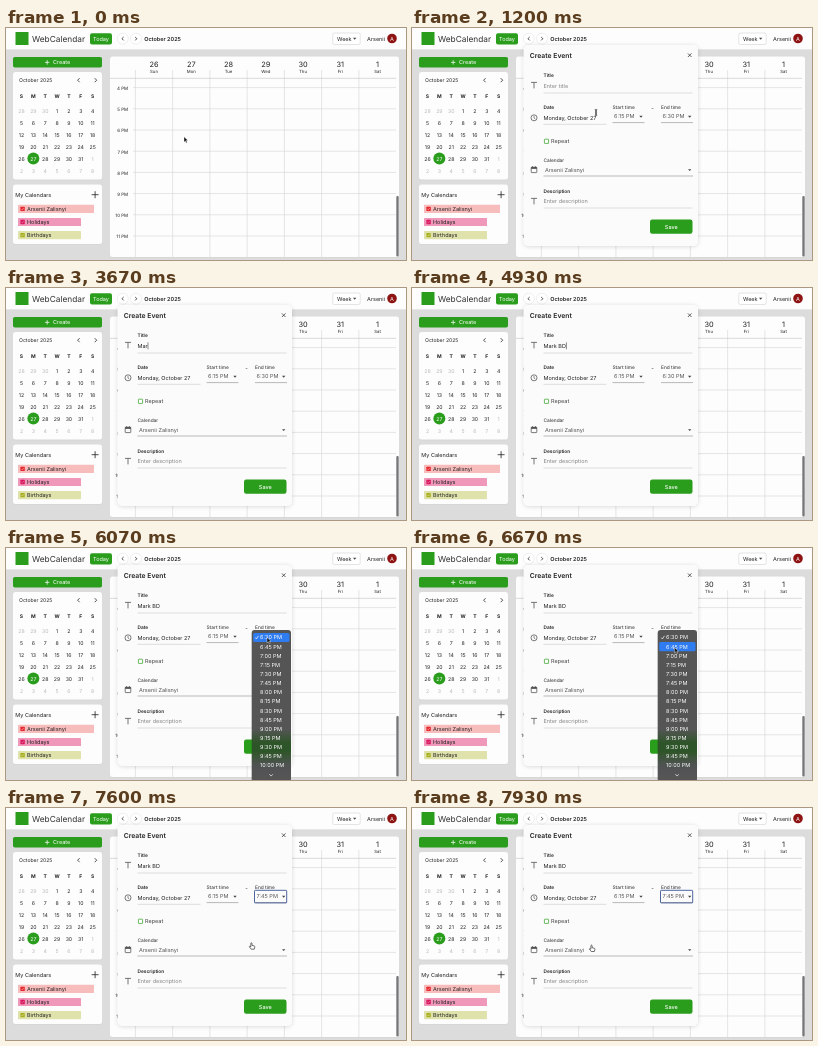
Animation, 400 px wide and 232 px high, one loop 8000 ms. Source, as an HTML page:

```html
<!DOCTYPE html>
<html lang="en">
<head>
<meta charset="utf-8">
<title>Calendar: create event</title>
<style>
  html, body { margin: 0; width: 100%; height: 100%; overflow: hidden; background: #dcdcdd; }
  svg { display: block; width: 100vw; height: 100vh; }
  text { font-family: Inter, Roboto, sans-serif; white-space: pre; text-rendering: geometricPrecision; }
</style>
</head>
<body>
<svg id="stage" viewBox="0 0 400 232" xmlns="http://www.w3.org/2000/svg">
  <defs>
    <filter id="soft" x="-20%" y="-20%" width="140%" height="140%">
      <feDropShadow dx="0" dy=".6" stdDeviation="2" flood-opacity=".15"/>
    </filter>
    <filter id="faint" x="-10%" y="-10%" width="120%" height="120%">
      <feDropShadow dx="0" dy=".2" stdDeviation=".6" flood-opacity=".12"/>
    </filter>
    <linearGradient id="menuFill" x1="0" y1="82" x2="0" y2="232" gradientUnits="userSpaceOnUse">
      <stop offset="0" stop-color="#555557"/>
      <stop offset=".66" stop-color="#555557"/>
      <stop offset=".75" stop-color="#2f5529"/>
      <stop offset=".81" stop-color="#2f5529"/>
      <stop offset=".9" stop-color="#505252"/>
      <stop offset="1" stop-color="#555557"/>
    </linearGradient>
  </defs>
</svg>
<script>
const LOOP = 8000;
const GREEN = '#2a9d1c', INK = '#222', MUTED = '#858585', LINE = '#d3d3d5';
const stage = document.getElementById('stage');

function add(parent, tag, attrs = {}, content) {
  const el = document.createElementNS('http://www.w3.org/2000/svg', tag);
  for (const key in attrs) el.setAttribute(key, attrs[key]);
  if (content !== undefined) el.textContent = content;
  parent.append(el);
  return el;
}
const group = (parent, attrs) => add(parent, 'g', attrs);
const rect = (parent, x, y, width, height, fill, more) =>
  add(parent, 'rect', { x, y, width, height, fill, ...more });
const label = (parent, x, y, content, more) =>
  add(parent, 'text', { x, y, fill: INK, 'font-size': 5.5, ...more }, content);
const stroke = (parent, d, color = INK, width = .7, more) =>
  add(parent, 'path', { d, fill: 'none', stroke: color, 'stroke-width': width, ...more });
const caretDown = (parent, x, y) =>
  add(parent, 'path', { d: `M${x - 1.7} ${y - .8}h3.4l-1.7 1.9z`, fill: '#444' });
const chevron = (parent, x, y, dir, size = 1.8) =>
  stroke(parent, `M${x - dir * size / 2} ${y - size}l${dir * size} ${size}l${-dir * size} ${size}`, INK, .8);
const middle = { 'text-anchor': 'middle' };
const bold = { 'font-weight': 600 };

function drawHeader() {
  const g = group(stage);
  rect(g, 0, 0, 400, 21.3, '#fdfdfd');
  rect(g, 9.5, 4, 13, 13, GREEN);
  label(g, 26, 13.6, 'WebCalendar', { 'font-size': 8.3, fill: '#333' });
  rect(g, 84, 5.2, 22, 11.3, GREEN, { rx: 2 });
  label(g, 95, 12.8, 'Today', { ...middle, fill: '#fff' });
  for (const [x, dir] of [[116.8, -1], [130, 1]]) {
    add(g, 'circle', { cx: x, cy: 10.7, r: 5.5, fill: '#fff', stroke: '#dedede', 'stroke-width': .5 });
    chevron(g, x, 10.7, dir, 1.7);
  }
  label(g, 138.2, 12.7, 'October 2025', bold);
  rect(g, 326.8, 5, 27.4, 11.5, '#fff', { rx: 1.5, stroke: '#c8c8c8', 'stroke-width': .5 });
  label(g, 331, 12.7, 'Week');
  caretDown(g, 348.7, 10.6);
  label(g, 379, 12.7, 'Arsenii', { 'text-anchor': 'end' });
  add(g, 'circle', { cx: 386, cy: 10.5, r: 4.8, fill: '#8e1414' });
  label(g, 386, 12.5, 'A', { ...middle, fill: '#fff' });
}

function drawSidebar() {
  const g = group(stage);
  rect(g, 7, 29, 89, 10.5, GREEN, { rx: 1.8 });
  stroke(g, 'M39 34.4h4.4M41.2 32.2v4.4', '#fff', .7);
  label(g, 47, 36.4, 'Create', { fill: '#fff' });

  rect(g, 7, 44, 89, 107.5, '#fdfdfd', { rx: 2.5, filter: 'url(#faint)' });
  label(g, 13, 54, 'October 2025', { 'font-size': 5.1 });
  chevron(g, 72.6, 52.2, -1, 2);
  chevron(g, 89.7, 52.2, 1, 2);
  const colX = i => 15.5 + i * 11.85;
  [...'SMTWTFS'].forEach((day, i) =>
    label(g, colX(i), 70.3, day, { ...middle, 'font-size': 5, 'font-weight': 700 }));
  for (let i = 0; i < 42; i++) {
    const offset = i - 2, x = colX(i % 7), y = 82.6 + Math.floor(i / 7) * 12;
    const inMonth = offset >= 1 && offset <= 31;
    const day = offset < 1 ? offset + 30 : (offset - 1) % 31 + 1;
    const today = offset === 27;
    if (today) add(g, 'circle', { cx: x, cy: y, r: 6, fill: GREEN });
    label(g, x, y + 1.9, day, { ...middle, 'font-size': 5.2, fill: today ? '#fff' : inMonth ? INK : '#b9b9b9' });
  }

  rect(g, 7, 156.5, 89, 59.5, '#fdfdfd', { rx: 2.5, filter: 'url(#faint)' });
  label(g, 9.3, 168.9, 'My Calendars');
  stroke(g, 'M85.6 166.7h7M89.1 163.2v7', INK, .8);
  const calendars = [
    ['Arsenii Zalisnyi', 76, '#f7bcbc', '#e5292f'],
    ['Holidays', 63, '#f098b9', '#d8175f'],
    ['Birthdays', 63, '#dfe2ab', '#a9b020']
  ];
  calendars.forEach(([name, width, fill, mark], i) => {
    const y = 176.8 + i * 13.1;
    rect(g, 12, y, width, 8.2, fill, { rx: .6 });
    rect(g, 14.4, y + 1.9, 4.4, 4.4, mark, { rx: .6 });
    stroke(g, `M15.4 ${y + 4.1}l.9 .9l1.5 -1.8`, fill, .6);
    label(g, 21, y + 6.1, name);
  });
}

function drawWeek() {
  const g = group(stage);
  const left = 129.4, step = 37.25;
  rect(g, 104, 28.5, 289, 200.5, '#fdfdfd', { rx: 2.5, filter: 'url(#faint)' });
  for (let i = 0; i < 8; i++) {
    const y = 59.6 + i * 21.2;
    label(g, 122.2, y + 2.4, `${i + 4} PM`, { 'text-anchor': 'end', 'font-size': 4.5 });
    stroke(g, `M127 ${y}H390`, LINE, .6);
  }
  ['Sun', 'Mon', 'Tue', 'Wed', 'Thu', 'Fri', 'Sat'].forEach((day, i) => {
    const x = left + i * step;
    stroke(g, `M${x} 42V229`, LINE, .6);
    label(g, x + step / 2, 39.3, (i + 25) % 31 + 1, { ...middle, 'font-size': 7.4 });
    label(g, x + step / 2, 45.2, day, { ...middle, 'font-size': 4.3 });
  });
  stroke(g, 'M104 50.3H390', '#c0c0c2', .6);
  rect(g, 390.3, 168, 2.4, 60.5, '#77777a', { rx: 1.1 });
}

function drawModal() {
  const g = group(stage);
  const small = { 'font-size': 4.8, ...bold };
  const caption = { 'font-size': 4.8, 'font-weight': 500, fill: '#444' };
  const rule = (x1, x2, y, color = '#bcbcbc') => stroke(g, `M${x1} ${y}H${x2}`, color, .5);
  const letterIcon = y => stroke(g, `M119 ${y - 2.6}h6M122 ${y - 2.6}v6`, '#555', .8);

  rect(g, 111.7, 17, 174.3, 201, '#fbfbfb', { rx: 5, filter: 'url(#soft)' });
  label(g, 117.7, 29.6, 'Create Event', { 'font-size': 6.8, ...bold });
  stroke(g, 'M275.9 25.4l3.6 3.6m0 -3.6l-3.6 3.6', INK, .7);

  letterIcon(57);
  label(g, 131.5, 49.3, 'Title', small);
  const title = label(g, 131.5, 59.9, '');
  const textCaret = rect(g, 131.5, 54.3, .5, 7, INK);
  rule(131.5, 280.5, 65);

  add(g, 'circle', { cx: 122, cy: 89.8, r: 3, fill: 'none', stroke: '#444', 'stroke-width': .7 });
  stroke(g, 'M122 88v2l1.3 .9', '#444', .6);
  label(g, 131.5, 81, 'Date', small);
  label(g, 131.5, 91.7, 'Monday, October 27');
  rule(131.5, 194.5, 96.3);

  label(g, 200.5, 81, 'Start time', caption);
  label(g, 202, 90.4, '6:15 PM', { fill: '#555' });
  caretDown(g, 229, 88.6);
  rule(200.5, 232.5, 94.6, '#777');
  label(g, 239.2, 82.2, '-');
  label(g, 249, 81, 'End time', caption);
  const endTime = label(g, 250.5, 90.4, '', { fill: '#555' });
  caretDown(g, 277.7, 88.6);
  rule(249, 281, 94.6, '#777');
  const focusRing = rect(g, 248.5, 82.3, 32.2, 12.6, 'none', { rx: .8, stroke: '#3a5596', 'stroke-width': .9 });

  rect(g, 132.4, 111.2, 4.2, 4.2, '#fff', { rx: .4, stroke: GREEN, 'stroke-width': .7 });
  label(g, 139, 115.4, 'Repeat', { fill: '#444' });

  rect(g, 119.2, 139.2, 5.6, 5.4, 'none', { rx: .5, stroke: '#444', 'stroke-width': .7 });
  rect(g, 119.2, 139.2, 5.6, 1.6, '#444');
  stroke(g, 'M120.5 138.2v1.2M123.5 138.2v1.2', '#444', .7);
  label(g, 131.5, 134.4, 'Calendar', caption);
  label(g, 133, 143.6, 'Arsenii Zalisnyi', { fill: '#555' });
  caretDown(g, 277.7, 142);
  rule(131.5, 281, 148, '#777');

  letterIcon(173);
  label(g, 131.5, 164.5, 'Description', small);
  label(g, 131.5, 175, 'Enter description', { fill: MUTED });
  rule(131.5, 280.5, 180);

  rect(g, 238, 191.6, 42.5, 14.2, GREEN, { rx: 2.2 });
  label(g, 259.3, 200.8, 'Save', { ...middle, fill: '#fff', 'font-weight': 500 });
  return { g, title, textCaret, endTime, focusRing };
}

const ROW = 9.14, MENU_TOP = 84.9;

function drawMenu() {
  const g = group(stage);
  rect(g, 245.7, 82, 39.3, 152, 'url(#menuFill)', { rx: 3, filter: 'url(#faint)' });
  const highlight = rect(g, 247.2, MENU_TOP, 36.3, ROW, '#2f7cf0', { rx: 1.5 });
  for (let i = 0; i < 15; i++) {
    const minutes = 390 + i * 15;
    const time = `${Math.floor(minutes / 60)}:${String(minutes % 60).padStart(2, '0')} PM`;
    label(g, 254, MENU_TOP + ROW * (i + .5) + 2, time, { fill: '#fff' });
  }
  stroke(g, 'M249.3 89.6l1.1 1.4l2 -3.2', '#fff', .7);
  stroke(g, 'M263.4 226.4l1.7 1.5l1.7 -1.5', '#fff', .7);
  return { g, highlight };
}

// Each pointer shape has its hot spot at 0,0.
function drawPointers() {
  const outline = { fill: '#fff', stroke: '#111', 'stroke-width': .6, 'stroke-linejoin': 'round' };
  const hand = group(stage), beam = group(stage), arrow = group(stage);
  add(hand, 'path', { d: 'M-.6 .5q.6-.9 1.2 0v2.2l2.3 .6q.7 .3 .5 1.2l-.6 2h-3l-2-2.5q0-.8 1.6 .1z', ...outline });
  const beamPath = 'M-1.2-3q1.2 0 1.2 .8v4.4q0 .8-1.2 .8M1.2-3q-1.2 0-1.2 .8v4.4q0 .8 1.2 .8';
  stroke(beam, beamPath, '#fff', 1.3);
  stroke(beam, beamPath, '#111', .7);
  add(arrow, 'path', { d: 'M0 0v5.4l1.3-1.2l.9 2l1-.4l-.9-2h1.7z', ...outline, fill: '#111', stroke: '#fff', 'stroke-width': .4 });
  return { hand, beam, arrow };
}

drawHeader();
drawSidebar();
drawWeek();
const modal = drawModal();
const menu = drawMenu();
const pointers = drawPointers();

// time, x, y
const path = [
  [0, 178, 108.8], [70, 178, 108.8], [130, 178.4, 108.4], [600, 178.4, 108.4],
  [1200, 184, 84.5], [1330, 184, 84], [1870, 183.3, 62], [2130, 183.3, 62],
  [2400, 183, 61], [4950, 183, 61], [5530, 261, 89], [6070, 261, 89.5],
  [6470, 262, 93], [7270, 265, 134], [7330, 265, 134], [7480, 265, 134], [7870, 179.5, 137]
];
const shapes = [[0, 'arrow'], [700, 'beam'], [3080, ''], [4980, 'beam'], [5250, 'hand'], [5780, 'arrow'], [7500, 'hand']];
const TITLE = 'Mark BD';
const keyTimes = [3130, 3270, 3400, 3730, 3930, 4270, 4530];
const OPEN = 470, FOCUS = 2730, MENU_OPEN = 5780, MENU_CLOSE = 7480;

function pointerAt(t) {
  const i = path.findIndex(p => p[0] > t);
  if (i < 0) return path[path.length - 1].slice(1);
  const [t0, x0, y0] = path[i - 1], [t1, x1, y1] = path[i];
  const u = (t - t0) / (t1 - t0), k = u * u * (3 - 2 * u);
  return [x0 + (x1 - x0) * k, y0 + (y1 - y0) * k];
}
const show = (el, visible) => el.setAttribute('visibility', visible ? 'visible' : 'hidden');

function render(t) {
  const opacity = Math.min(1, Math.max(0, (t - OPEN) / 160));
  modal.g.setAttribute('opacity', opacity);
  modal.g.setAttribute('display', opacity ? 'inline' : 'none');

  const typed = TITLE.slice(0, keyTimes.filter(k => k <= t).length);
  modal.title.textContent = typed || 'Enter title';
  modal.title.setAttribute('fill', typed ? INK : MUTED);
  const lastKey = Math.max(FOCUS, ...keyTimes.filter(k => k <= t));
  const caretOn = t >= FOCUS && t < MENU_OPEN - 60 && (t - lastKey) % 1000 < 500;
  show(modal.textCaret, caretOn);
  if (caretOn) modal.textCaret.setAttribute('x', 131.6 + (typed ? modal.title.getComputedTextLength() : 0));

  modal.endTime.textContent = t < MENU_CLOSE ? '6:30 PM' : '7:45 PM';
  show(modal.focusRing, t >= MENU_CLOSE);

  const [x, y] = pointerAt(t);
  const fade = Math.min(1, Math.max(0, 1 - (t - MENU_CLOSE) / 100));
  menu.g.setAttribute('display', t >= MENU_OPEN && fade > 0 ? 'inline' : 'none');
  menu.g.setAttribute('opacity', fade);
  const row = t >= MENU_CLOSE ? 5 : Math.max(0, Math.floor((y - MENU_TOP) / ROW));
  menu.highlight.setAttribute('y', MENU_TOP + row * ROW);

  const active = shapes.filter(s => s[0] <= t).pop()[1];
  for (const name in pointers) {
    show(pointers[name], name === active);
    pointers[name].setAttribute('transform', `translate(${x} ${y})`);
  }
}

const start = performance.now();
function tick() {
  render((performance.now() - start) % LOOP);
  requestAnimationFrame(tick);
}
tick();
</script>
</body>
</html>
```
